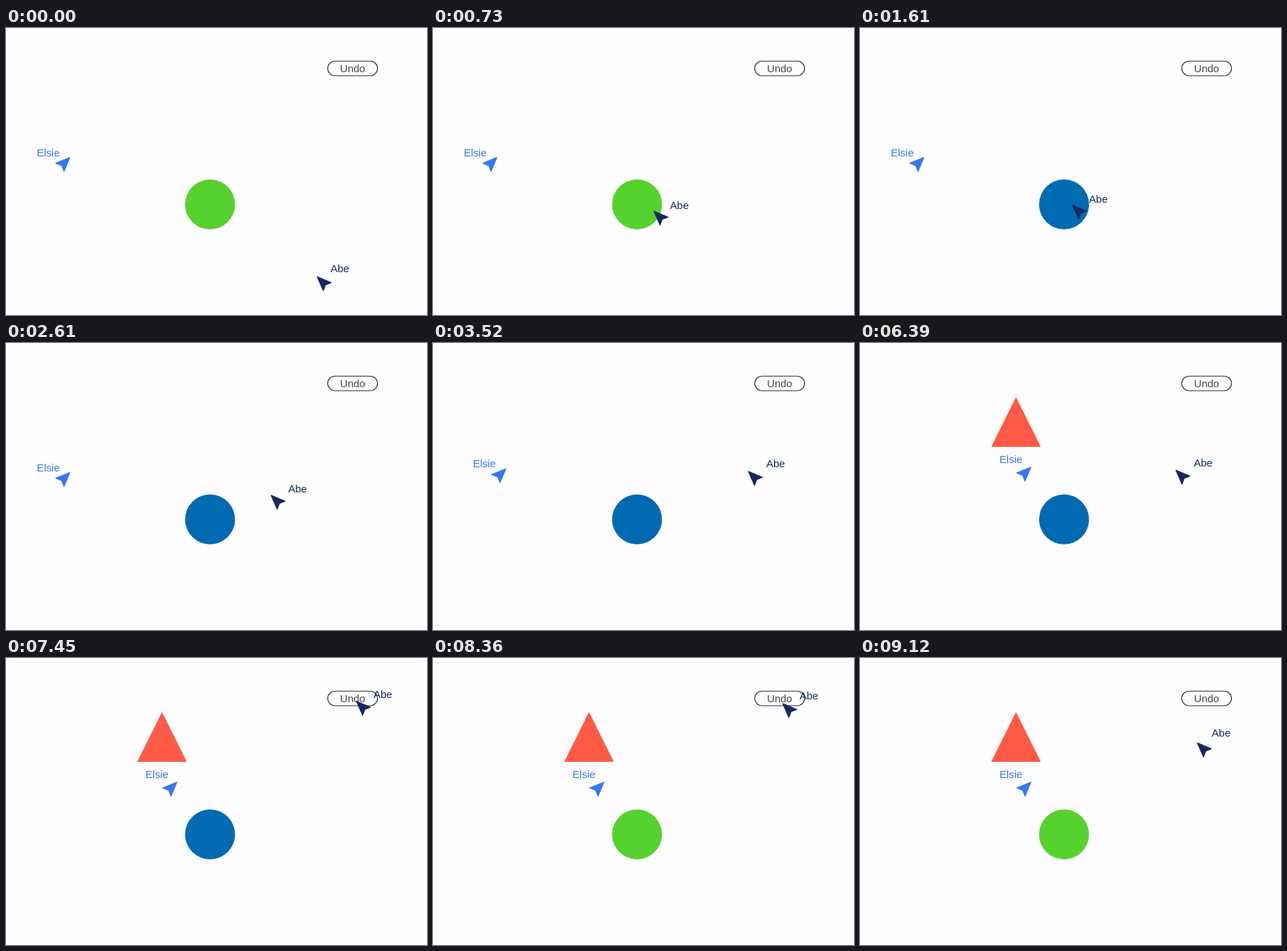
Recreate the animation shown at these times as an HTML page. Size 600 px wide and 409 px high, loop 9.18 s.

```html
<!DOCTYPE html>
<html lang="en">
<head>
<meta charset="utf-8">
<title>Shared undo</title>
<style>
  html, body { margin: 0; width: 100%; height: 100%; overflow: hidden; background: #fefdff; }
  svg { display: block; width: 100%; height: 100%; }
  text { font: 15px "Liberation Sans", Arial, sans-serif; }
  .cursor path { stroke-width: 1.4; stroke-linejoin: round; }
  #left { fill: #3478f2; }
  #left path { stroke: #3478f2; }
  #right { fill: #14295f; }
  #right path { stroke: #14295f; }
</style>
</head>
<body>
<svg viewBox="0 0 600 409">
  <rect x="458.5" y="47.2" width="71" height="20.8" rx="10.4" fill="#fefdff" stroke="#2b2b2b" stroke-width="1.1"/>
  <text x="494" y="63" text-anchor="middle" fill="#484848">Undo</text>
  <circle id="circle" cx="290.8" cy="251.4" r="35.6"/>
  <path id="triangle" d="M222.3 77 L257.7 148 H187 Z" fill="#ff5a46"/>
  <g id="left" class="cursor">
    <path d="M-.7 .7 L-20.5 8.7 L-12 12 L-8.8 20.2 Z"/>
    <text>Elsie</text>
  </g>
  <g id="right" class="cursor">
    <path d="M.7 .7 L20.3 8.9 L12.2 12 L9.2 20.2 Z"/>
    <text>Abe</text>
  </g>
</svg>
<script>
const LOOP = 9180;
const CIRCLE_CLICK = 1460, TRIANGLE_CLICK = 4730, UNDO_CLICK = 7800;
const $ = id => document.getElementById(id);

// Poses are [tip x, tip y, label x, label baseline].
const cursors = [
  {
    node: $("left"),
    start: [91.5, 184, 44, 182.5],
    moves: [
      { from: 3335, to: 4215, pose: [212, 135, 165.7, 130.5] },
      { from: 5390, to: 6290, pose: [244, 176.5, 198.8, 171.3] }
    ]
  },
  {
    node: $("right"),
    start: [443, 354, 462.5, 348],
    moves: [
      { from: 0, to: 900, pose: [302.5, 252, 326.3, 249.3] },
      { from: 2155, to: 3055, pose: [449, 182.5, 475, 177.3] },
      { from: 6315, to: 7315, pose: [499, 61.3, 523.7, 56.5] },
      { from: 8230, to: 9120, pose: [480.3, 120.5, 501.3, 112.3] }
    ]
  }
];

const ease = p => (1 - Math.cos(Math.PI * Math.min(1, Math.max(0, p)))) / 2;

function poseAt({ start, moves }, t) {
  return moves.reduce((pose, move) => {
    const k = ease((t - move.from) / (move.to - move.from));
    return pose.map((v, i) => v + (move.pose[i] - v) * k);
  }, start);
}

function render(t) {
  const blue = t >= CIRCLE_CLICK && t < UNDO_CLICK;
  $("circle").setAttribute("fill", blue ? "#006ab3" : "#56d22e");
  $("triangle").setAttribute("visibility", t >= TRIANGLE_CLICK ? "visible" : "hidden");
  for (const cursor of cursors) {
    const [x, y, labelX, labelY] = poseAt(cursor, t);
    const [arrow, label] = cursor.node.children;
    arrow.setAttribute("transform", `translate(${x} ${y})`);
    label.setAttribute("x", labelX);
    label.setAttribute("y", labelY);
  }
}

const began = performance.now();
function tick() {
  render((performance.now() - began) % LOOP);
  requestAnimationFrame(tick);
}
tick();
</script>
</body>
</html>
```
